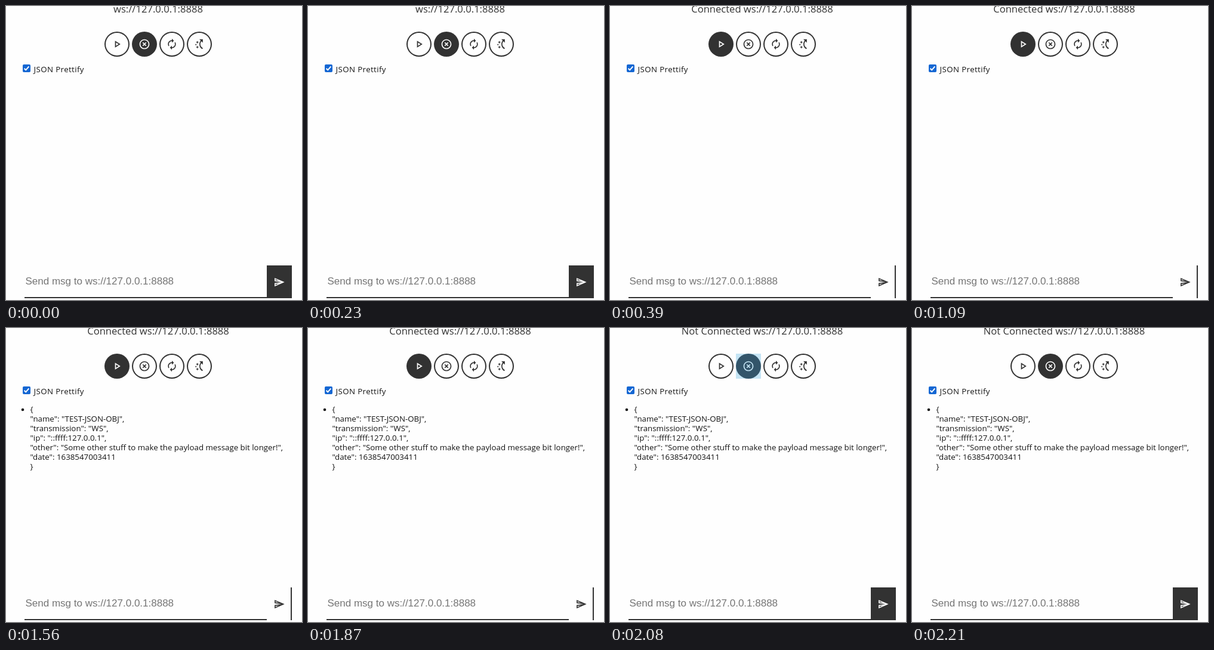
Animation, 496 px wide and 493 px high, one loop 2600 ms. Source, as an HTML page with a canvas:

```html
<!DOCTYPE html>
<html lang="en">
<head>
<meta charset="utf-8">
<title>WebSocket client</title>
<style>
  html, body { margin: 0; width: 100%; height: 100%; overflow: hidden; background: #fefefe; }
  canvas { display: block; width: 496px; height: 493px; }
</style>
</head>
<body>
<canvas id="stage"></canvas>
<script>
const W = 496, H = 493, LOOP = 2600;
const DARK = '#323232', PAPER = '#fefefe', INK = '#141414';
const SANS = '"Open Sans", "Noto Sans", sans-serif';
const URL_TEXT = 'ws://127.0.0.1:8888';

const canvas = document.getElementById('stage');
const ctx = canvas.getContext('2d');
const dpr = window.devicePixelRatio || 1;
canvas.width = W * dpr;
canvas.height = H * dpr;
ctx.scale(dpr, dpr);

// Icons on a 24-unit grid
const icons = {
  play: 'M10 8.64L15.27 12 10 15.36V8.64M8 5v14l11-7z',
  close: 'M14.59 8L12 10.59 9.41 8 8 9.41 10.59 12 8 14.59 9.41 16 12 13.41 14.59 16 16 14.59 13.41 12 16 9.41zM12 2C6.47 2 2 6.47 2 12s4.47 10 10 10 10-4.47 10-10S17.53 2 12 2zm0 18c-4.41 0-8-3.59-8-8s3.59-8 8-8 8 3.59 8 8-3.59 8-8 8z',
  renew: 'M12 6v3l4-4-4-4v3c-4.42 0-8 3.58-8 8 0 1.57.46 3.03 1.24 4.26L6.7 14.8c-.45-.83-.7-1.79-.7-2.8 0-3.31 2.69-6 6-6zm6.76 1.74L17.3 9.2c.44.84.7 1.79.7 2.8 0 3.31-2.69 6-6 6v-3l-4 4 4 4v-3c4.42 0 8-3.58 8-8 0-1.57-.46-3.03-1.24-4.26z',
  shortcut: 'M7.06 8.94L5 8l2.06-.94L8 5l.94 2.06L11 8l-2.06.94L8 11zM8 21l.94-2.06L11 18l-2.06-.94L8 15l-.94 2.06L5 18l2.06.94zM4.37 12.37L3 13l1.37.63L5 15l.63-1.37L7 13l-1.37-.63L5 11zM12 12c0-2.73 1.08-5.27 2.75-7.25L12 2h7v7l-2.82-2.82C14.84 7.82 14 9.88 14 12c0 3.32 2.1 6.36 5 7.82L18.09 22C14.26 20.16 12 16.24 12 12z',
  send: 'M4.01 6.03l7.51 3.22-7.52-1 .01-2.22m7.5 8.72L4 17.97v-2.22l7.51-1M2.01 3L2 10l15 2-15 2 .01 7L23 12z'
};
for (const name in icons) icons[name] = new Path2D(icons[name]);

const message = [
  '{',
  '"name": "TEST-JSON-OBJ",',
  '"transmission": "WS",',
  '"ip": "::ffff:127.0.0.1",',
  '"other": "Some other stuff to make the payload message bit longer!",',
  '"date": 1638547003411',
  '}'
];

function rect(x, y, w, h, color) {
  ctx.fillStyle = color;
  ctx.fillRect(x, y, w, h);
}

function disc(x, y, r, color) {
  ctx.fillStyle = color;
  ctx.beginPath();
  ctx.arc(x, y, r, 0, Math.PI * 2);
  ctx.fill();
}

function text(str, x, y, size, color, { family = SANS, align = 'left', spacing = 0 } = {}) {
  ctx.font = `${size}px ${family}`;
  ctx.letterSpacing = `${spacing}px`;
  ctx.textAlign = align;
  ctx.fillStyle = color;
  ctx.fillText(str, x, y);
}

function icon(name, cx, cy, size, color) {
  ctx.save();
  ctx.translate(cx - size / 2, cy - size / 2);
  ctx.scale(size / 24, size / 24);
  ctx.fillStyle = color;
  ctx.fill(icons[name], 'evenodd');
  ctx.restore();
}

function roundButton(name, x, active, selected) {
  const y = 64;
  const dark = selected ? '#33556a' : DARK;
  const light = selected ? '#c4e4f4' : PAPER;
  if (selected) rect(x - 21, y - 21, 42, 42, light);
  disc(x, y, 21, dark);
  if (!active) disc(x, y, 19, light);
  icon(name, x, y, 20, active ? light : dark);
}

function checkbox(x, y) {
  ctx.fillStyle = '#1567d3';
  ctx.beginPath();
  ctx.roundRect(x, y, 13, 13, 2);
  ctx.fill();
  ctx.strokeStyle = '#fff';
  ctx.lineWidth = 2;
  ctx.beginPath();
  ctx.moveTo(x + 2.6, y + 6.8);
  ctx.lineTo(x + 5.2, y + 9.4);
  ctx.lineTo(x + 10.4, y + 3.4);
  ctx.stroke();
}

function sendBar(connected) {
  text('Send msg to ' + URL_TEXT, 32.5, 467, 17, '#757575',
    { family: '"Liberation Sans", Arial, sans-serif' });
  rect(31, 488, 406, 2, DARK);
  if (connected) rect(477, 435, 2, 55, DARK);
  else rect(437, 435, 42, 55, DARK);
  icon('send', 458, 463, 19, connected ? DARK : PAPER);
}

function draw(t) {
  const connected = t >= 390 && t < 2080;
  const received = t >= 1560;
  const selected = t >= 2080 && t < 2210;
  const status = connected ? 'Connected ' : received ? 'Not Connected ' : '';

  rect(0, 0, W, H, PAPER);
  text(status + URL_TEXT, 255, 11, 16.6, '#333', { align: 'center' });

  roundButton('play', 186, connected);
  roundButton('close', 232, !connected, selected);
  roundButton('renew', 278);
  roundButton('shortcut', 324);

  checkbox(28, 98);
  text('JSON Prettify', 46.5, 111, 13.3, INK, { spacing: 0.4 });

  if (received) {
    disc(28, 137, 2.3, INK);
    message.forEach((line, i) => text(line, 40.5, 141 + i * 16, 13.3, INK));
  }
  sendBar(connected);
}

function tick() {
  draw(performance.now() % LOOP);
  requestAnimationFrame(tick);
}
tick();
</script>
</body>
</html>
```
